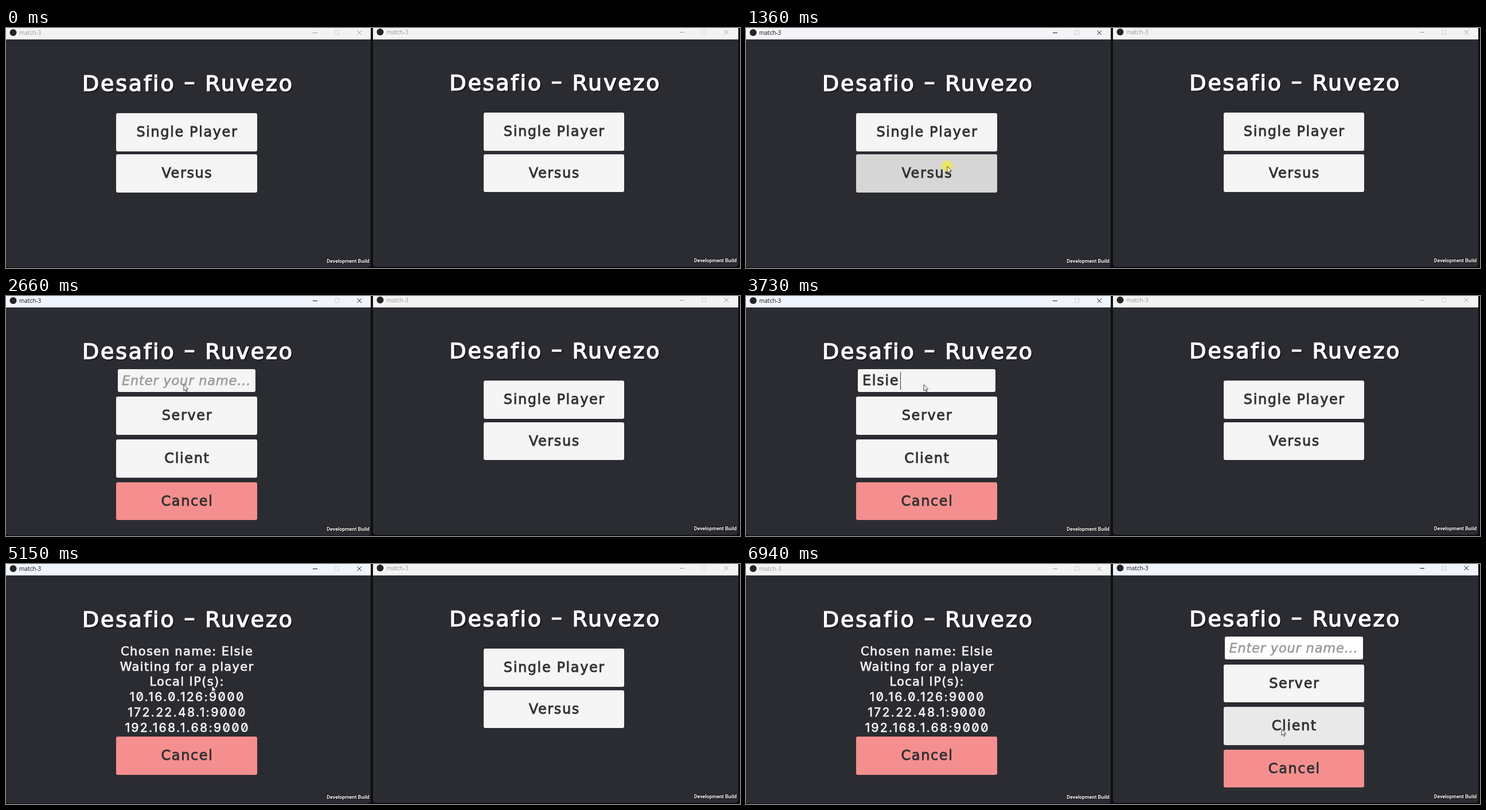
Animation, 1280 px wide and 420 px high, one loop 8000 ms. Source, as an HTML page:

```html
<!DOCTYPE html>
<html lang="en">
<head>
<meta charset="utf-8">
<title>match-3</title>
<style>
html, body { margin: 0; width: 1280px; height: 420px; overflow: hidden; background: #0c0e11; }
div, span, svg { box-sizing: border-box; }

/* every animation shares one 8 s clock */
.anim { animation: 8s step-end infinite; }
.fade { animation: 8s linear infinite; }

.win { position: absolute; top: 0; left: 0; width: 636.3px; height: 418.5px; overflow: hidden;
  background: #2b2c32; border-radius: 0 0 5px 5px; font-family: "DejaVu Sans", sans-serif; }
.right { left: 640.4px; top: -.7px; height: 419px; }

.bar { position: absolute; inset: 0 0 auto; height: 20.4px; background: #f3f3f3; color: #989898;
  font: 10px/16px "Open Sans", "Noto Sans", sans-serif; }
.bar span { position: absolute; left: 23px; top: 0; }
.bar svg { position: absolute; left: 0; top: 0; }

h1 { position: absolute; left: 0; top: 73px; width: 632px; margin: 0; text-align: center; color: #fff;
  font-size: 38px; font-weight: 400; line-height: 49px; letter-spacing: .074em; text-indent: .074em;
  white-space: nowrap; -webkit-text-stroke: 1.5px #fff; text-shadow: 2px 2px 1px #0b0b0d; }
h1 span { position: relative; top: -3px; }
.build { position: absolute; right: 2.5px; top: 402px; color: #fff; font: 700 8.8px/12px Roboto, sans-serif;
  text-shadow: 1px 1px 0 #000, -1px 0 0 #000, 0 -1px 0 #000; }

.page { position: absolute; inset: 0; }
.btn { position: absolute; left: 192.3px; top: var(--y); width: 245.7px; height: 66.5px; border-radius: 3px;
  background: #f5f5f5; color: #323232; text-align: center; font-size: 24px; line-height: 67px;
  letter-spacing: .067em; text-indent: .067em; -webkit-text-stroke: .9px #323232; }
.cancel { background: #f58f8f; }

.input { position: absolute; left: 195px; top: 128px; width: 240.3px; height: 40px; border-radius: 3px;
  background: #fff; white-space: nowrap; color: #323232; }
.hint { position: absolute; left: 7px; top: 0; font-size: 22.5px; line-height: 40px; font-style: italic;
  letter-spacing: .036em; color: #9a9a9a; -webkit-text-stroke: .6px #9a9a9a; }
.typed { position: absolute; left: 8px; top: 5px; width: 1px; height: 31px; overflow: hidden;
  border-right: 1px solid transparent; font-size: 24px; line-height: 31px; letter-spacing: .07em;
  -webkit-text-stroke: .9px #323232; }

.wait { position: absolute; left: 115px; top: 139.6px; width: 400px; text-align: center; color: #f7f7f7;
  font-size: 21px; line-height: 26.9px; letter-spacing: .065em; text-indent: .065em;
  -webkit-text-stroke: .7px #f7f7f7; }
.ip { font-family: Inter, sans-serif; font-weight: 500; font-variant-numeric: slashed-zero;
  letter-spacing: .105em; text-indent: .105em; -webkit-text-stroke: .3px #f7f7f7; }

.pointer { position: absolute; left: 0; top: 0; width: 0; height: 0; animation-name: move; }
.pointer svg { position: absolute; left: -1px; top: -1px; }
.click { position: absolute; left: -10px; top: -10px; width: 20px; height: 20px; border-radius: 50%;
  background: #ebe763; opacity: 0; animation-name: click; }

/* pages */
.left .start { animation-name: start-l; }
.left .setup { animation-name: setup-l; }
.left .lobby { animation-name: lobby-l; }
.right .start { animation-name: start-r; }
.right .setup { animation-name: setup-r; }
@keyframes start-l { 0% { opacity: 1 } 17.85%, to { opacity: 0 } }
@keyframes setup-l { 0% { opacity: 0 } 17.85% { opacity: 1 } 64.32%, to { opacity: 0 } }
@keyframes lobby-l { 0% { opacity: 0 } 64.32%, to { opacity: 1 } }
@keyframes start-r { 0% { opacity: 1 } 79.85%, to { opacity: 0 } }
@keyframes setup-r { 0% { opacity: 0 } 79.85%, to { opacity: 1 } }

/* title bars */
.left .bar { animation-name: bar-l; }
.right .bar { animation-name: bar-r; }
@keyframes bar-l {
  0% { color: #989898; background: #f3f3f3 }
  .85% { color: #505050; background: #f3f4f6 }
  1.6% { color: #111; background: #f3f4f7 }
  17.85% { color: #111; background: #f0f4fc }
  76.3%, to { color: #989898; background: #f3f3f3 }
}
@keyframes bar-r {
  0% { color: #989898; background: #f3f3f3 }
  76.3% { color: #111; background: #f2f4f8 }
  79.85%, to { color: #111; background: #f0f4fc }
}

/* button and field tints */
.left .versus { animation-name: versus-l; }
.left .server { animation-name: server-l; }
.left .input { animation-name: input-l; }
.right .versus { animation-name: versus-r; }
.right .server { animation-name: server-r; }
.right .client { animation-name: client-r; }
@keyframes versus-l {
  0%, 10.2% { background: #f5f5f5 }
  11.8%, 16.1% { background: #e6e6e6 }
  16.9%, to { background: #d6d6d6 }
}
@keyframes server-l {
  0%, 19.6% { background: #f5f5f5 }
  20.4%, 21.2% { background: #eaeaea }
  22.4%, 52.6% { background: #f5f5f5 }
  53.8%, 59.3% { background: #e5e5e5 }
  60.2%, to { background: #d6d6d6 }
}
@keyframes input-l {
  0%, 22.1% { background: #fff }
  23%, 24.7% { background: #f5f5f5 }
  25.6%, 26.5% { background: #cdcdcd }
  28.2%, to { background: #f5f5f5 }
}
@keyframes versus-r {
  0%, 76.3% { background: #f5f5f5 }
  77.2%, 78.1% { background: #e7e7e7 }
  79%, to { background: #d6d6d6 }
}
@keyframes server-r {
  0%, 79.9% { background: #f5f5f5 }
  80.7% { background: #eaeaea }
  82%, to { background: #f5f5f5 }
}
@keyframes client-r {
  0%, 81.5% { background: #f5f5f5 }
  82.8%, to { background: #e9e9e9 }
}

/* typing */
.left .hint { animation-name: hint; }
.left .typed { animation-name: type; }
@keyframes hint { 0% { opacity: 1 } 35.7%, to { opacity: 0 } }
@keyframes type {
  0% { width: 1px; border-color: transparent }
  25.6% { width: 1px; border-color: #323232 }
  33.2% { width: 1px; border-color: transparent }
  35.7% { width: 18px; border-color: #323232 }
  39.2% { width: 27px; border-color: #323232 }
  41.7% { width: 41px; border-color: #323232 }
  43.3% { width: 49px; border-color: #323232 }
  46.6% { width: 67px; border-color: #323232 }
  54%, to { width: 67px; border-color: transparent }
}

/* pointer: holds, then short runs at about 15 steps a second */
@keyframes move {
  0% { transform: translate(1123px, 440px) }
  4.1% { transform: translate(1123px, 404px); animation-timing-function: steps(3) }
  6.7% { transform: translate(466px, 258px) }
  8.35% { transform: translate(466px, 258px); animation-timing-function: steps(9) }
  16.1% { transform: translate(351px, 242px) }
  18.7% { transform: translate(351px, 242px); animation-timing-function: steps(5) }
  22.95% { transform: translate(310px, 155px) }
  49.8% { transform: translate(310px, 155px); animation-timing-function: steps(9) }
  57.4% { transform: translate(359px, 213px) }
  64.35% { transform: translate(359px, 213px); animation-timing-function: steps(5) }
  68.7% { transform: translate(791px, 248px) }
  70.35% { transform: translate(791px, 248px); animation-timing-function: steps(4) }
  73.8% { transform: translate(922px, 241px) }
  79.85% { transform: translate(922px, 241px); animation-timing-function: steps(7) }
  85.8% { transform: translate(933px, 288px) }
  86.7%, to { transform: translate(934px, 289px) }
}
@keyframes click {
  0% { opacity: 0 }
  16.1% { opacity: .95 } 17.85% { opacity: 0 }
  24.7% { opacity: .95 } 26.5% { opacity: 0 }
  59.3% { opacity: .95 } 60.2% { opacity: 0 }
  78.1% { opacity: .95 } 79.85%, to { opacity: 0 }
}
</style>
</head>
<body>
<svg width="0" height="0" style="position:absolute">
  <symbol id="controls" viewBox="0 0 637 20">
    <circle cx="12.5" cy="8" r="6" fill="#242424"/>
    <g fill="none" stroke="currentColor">
      <path d="M535 8.5h8"/>
      <path d="M573.5 4.5h7v7h-7z" stroke="#cfcfcf"/>
      <path d="M612.5 4.5l7.5 7.5m0-7.5l-7.5 7.5"/>
    </g>
  </symbol>
</svg>

<div class="win left">
  <div class="bar anim"><svg width="637" height="20"><use href="#controls"/></svg><span>match-3</span></div>
  <h1>Desafio <span>–</span> Ruvezo</h1>
  <div class="page start anim">
    <div class="btn" style="--y:149px">Single Player</div>
    <div class="btn versus fade" style="--y:221.3px">Versus</div>
  </div>
  <div class="page setup anim">
    <div class="input fade"><span class="hint anim">Enter your name...</span><span class="typed anim">Elsie</span></div>
    <div class="btn server fade" style="--y:176.2px">Server</div>
    <div class="btn" style="--y:251px">Client</div>
    <div class="btn cancel" style="--y:325.6px">Cancel</div>
  </div>
  <div class="page lobby anim">
    <div class="wait">
      <div>Chosen name: Elsie</div>
      <div>Waiting for a player</div>
      <div>Local IP(s):</div>
      <div class="ip">10.16.0.126:9000</div>
      <div class="ip">172.22.48.1:9000</div>
      <div class="ip">192.168.1.68:9000</div>
    </div>
    <div class="btn cancel" style="--y:302.4px">Cancel</div>
  </div>
  <div class="build">Development Build</div>
</div>

<div class="win right">
  <div class="bar anim"><svg width="637" height="20"><use href="#controls"/></svg><span>match-3</span></div>
  <h1>Desafio <span>–</span> Ruvezo</h1>
  <div class="page start anim">
    <div class="btn" style="--y:149px">Single Player</div>
    <div class="btn versus fade" style="--y:221.3px">Versus</div>
  </div>
  <div class="page setup anim">
    <div class="input"><span class="hint">Enter your name...</span></div>
    <div class="btn server fade" style="--y:176.2px">Server</div>
    <div class="btn client fade" style="--y:251px">Client</div>
    <div class="btn cancel" style="--y:325.6px">Cancel</div>
  </div>
  <div class="build">Development Build</div>
</div>

<div class="pointer anim">
  <div class="click anim"></div>
  <svg width="11" height="16" viewBox="-1 -1 11 16">
    <path d="M0 0V11L2.6 8.7L4.3 12.6L6 11.9L4.3 8.1H7.7Z" fill="#fff" stroke="#2a2a2a" stroke-width=".9"/>
  </svg>
</div>
</body>
</html>
```
